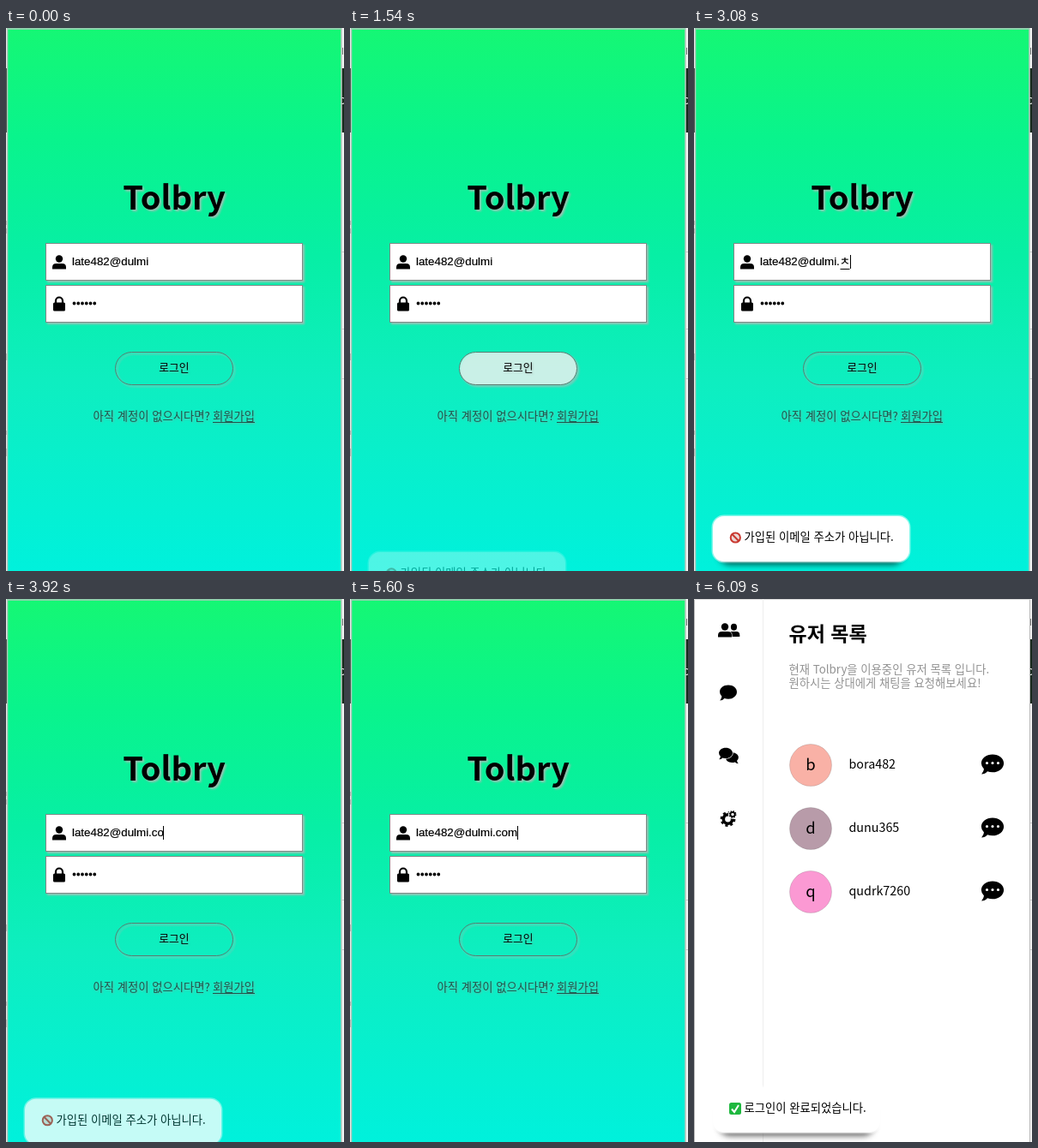
An HTML page that plays this animation: 394 by 634 pixels, repeating every 6860 ms.

```html
<!DOCTYPE html>
<html lang="ko">
<head>
<meta charset="utf-8">
<style>
  html, body { margin: 0; width: 100%; height: 100%; overflow: hidden; background: #fff; }
  svg { display: block; width: 394px; height: 634px; font: 13.33px "Noto Sans CJK KR", "Noto Sans CJK", "Noto Sans", sans-serif; }
  text { white-space: pre; }
  .shadow { filter: drop-shadow(2px 2px 1px rgba(178, 184, 182, .85)); }
  .soft { filter: drop-shadow(1px 1px 1px rgba(150, 160, 156, .6)); }
  .field { fill: #fff; stroke: #7d8a86; }
  .typed { font-family: "Liberation Sans", Arial, sans-serif; stroke: #000; stroke-width: .2px; }
  .mid { text-anchor: middle; }
  #toastShadow { filter: blur(3.5px); }
</style>
</head>
<body>
<svg viewBox="0 0 394 634">
  <defs>
    <linearGradient id="sky" x2="0" y2="1">
      <stop stop-color="#15f774"/>
      <stop offset=".2" stop-color="#09f48c"/>
      <stop offset=".42" stop-color="#07efa5"/>
      <stop offset=".65" stop-color="#0eeec0"/>
      <stop offset="1" stop-color="#00f1dc"/>
    </linearGradient>
    <path id="bubble" d="M0-9C6-9 10.5-5.5 10.5-1S6 7.3 0 7.3Q-2.6 7.3-4.8 6.5-7 9-10.3 9-8.2 6.6-8 4.3-10.5 2-10.5-1C-10.5-5.5-6-9 0-9Z"/>
    <g id="person"><circle cy="-4" r="4.2"/><path d="M-8 8V6Q-8 1.6-3.5 1.6H3.5Q8 1.6 8 6V8Z"/></g>
    <g id="gear" fill="none" stroke="#000">
      <circle r="5.2" stroke-width="3.6"/>
      <circle r="7.6" stroke-width="2.6" stroke-dasharray="3 2.97"/>
    </g>
  </defs>

  <!-- page behind the window -->
  <rect width="394" height="634" fill="#f4f4f4"/>
  <path d="M0 47h1v75h-1zM390 47h4v75h-4z" fill="#182a1d"/>
  <path d="M0 225v5m0 4v6m0 140v8m0 82v5m0 16v9M392.5 23v8" stroke="#777"/>
  <path d="M391 261.5h3m-3 90h3m-3 58h3" stroke="#ccc"/>
  <text x="388" y="89" fill="#fff">c</text>

  <g id="login">
    <rect x="1" width="390" height="634" fill="url(#sky)"/>
    <path d="M1.5 634V1H391V634" fill="none" stroke="#b4c8be" stroke-width="1.6"/>
    <text class="mid shadow" x="196" y="212" font-size="38" font-weight="700">Tolbry</text>
    <g class="shadow">
      <rect class="field" x="46.5" y="251.5" width="299" height="43"/>
      <rect class="field" x="46.5" y="300.5" width="299" height="43"/>
    </g>
    <use href="#person" x="62" y="273.5"/>
    <rect x="55" y="320.5" width="14" height="10" rx="1.6"/>
    <path d="M58 321v-2.5a4 4 0 0 1 8 0v2.5" fill="none" stroke="#000" stroke-width="2.2"/>
    <text class="typed" id="mail" x="77" y="277"></text>
    <path id="compose" stroke="#000" d="M170.5 281.5H181.5"/>
    <path id="caret" stroke="#000" d="M.5 265V281"/>
    <path d="M79.5 321.5h24" stroke="#000" stroke-width="3.8" stroke-linecap="round" stroke-dasharray="0 4.75"/>
    <rect id="button" class="shadow" x="127.5" y="378.5" width="137" height="38" rx="19" fill="#fff" stroke="#5b7d72"/>
    <text class="mid soft" x="196" y="401" font-size="12.8" font-weight="500">로그인</text>
    <g class="soft" fill="#24534b">
      <text x="101.5" y="458">아직 계정이 없으시다면?</text>
      <text x="241" y="458">회원가입</text>
      <path d="M241 460h49v1h-49z"/>
    </g>
  </g>

  <g id="list">
    <rect x="1" width="390" height="634" fill="#fff"/>
    <path d="M.5 0V634M391.5 0V634" stroke="#b9b9b9"/>
    <path d="M0 .5H392" stroke="#ddd"/>
    <path d="M80.5 0V634" stroke="#eee"/>
    <use href="#person" transform="translate(46.5 36.5) scale(.85 .95)"/>
    <use href="#person" transform="translate(36 36.5)" stroke="#fff" stroke-width="1.2" paint-order="stroke"/>
    <use href="#bubble" transform="translate(40 109.5) scale(.95 1)"/>
    <use href="#bubble" transform="translate(44.3 185.7) scale(-.72 .72)"/>
    <use href="#bubble" transform="translate(37 180.5) scale(.76)" stroke="#fff" stroke-width="2" paint-order="stroke"/>
    <use href="#gear" x="39.5" y="257"/>
    <circle cx="45" cy="251.5" r="5.2" fill="#fff"/>
    <use href="#gear" transform="translate(45 251.5) scale(.5)"/>
    <text x="110.5" y="49" font-size="23" font-weight="700">유저 목록</text>
    <g fill="#929292">
      <text x="110.5" y="87">현재 Tolbry을 이용중인 유저 목록 입니다.</text>
      <text x="110.5" y="103">원하시는 상대에게 채팅을 요청해보세요!</text>
    </g>
    <g id="users"></g>
  </g>

  <g id="toast">
    <rect id="toastShadow" x="29" y="590" height="37" rx="13" fill-opacity=".6"/>
    <rect id="toastBox" x="22" y="570" height="53" rx="13" fill="#fff" stroke="#fff" stroke-opacity=".5" stroke-width="3"/>
    <g id="denied" fill="none" stroke="#c9382f" stroke-width="2">
      <circle cx="48.3" cy="595" r="5.6" fill="#ead9d6"/><path d="M44.4 591l7.8 8"/>
    </g>
    <g id="done">
      <rect x="41" y="588" width="14" height="14" rx="2.5" fill="#1fb83f"/>
      <path d="M44 595.5l3 3.5 5-8" fill="none" stroke="#fff" stroke-width="2"/>
    </g>
    <text id="message" x="58.5" y="599" font-weight="500"></text>
  </g>
</svg>
<script>
const LOOP = 6860, STEP = 70, LOGGED_IN = 5670;
const $ = id => document.getElementById(id);
const ease = (t, from, to) => {
  const p = Math.min(1, Math.max(0, (t - from) / (to - from)));
  return p * p * (3 - 2 * p);
};
const show = (id, on) => $(id).setAttribute('visibility', on ? 'visible' : 'hidden');

const users = [['bora482', '#f9b1a6'], ['dunu365', '#b89ba9'], ['qudrk7260', '#fb99d3']];
$('users').innerHTML = users.map(([name, color], i) => `
  <g transform="translate(0 ${194 + 74 * i})">
    <circle cx="136" r="24.5" fill="${color}" stroke="#555" stroke-opacity=".2"/>
    <text class="mid" x="136" y="6" font-size="18.5">${name[0]}</text>
    <text x="180.5" y="4" font-size="14.3" font-weight="500">${name}</text>
    <use href="#bubble" transform="translate(348 -1) scale(1.25 1.28)"/>
    <path d="M341.5-2.5h14" stroke="#fff" stroke-width="3.2" stroke-linecap="round" stroke-dasharray="0 6.5"/>
  </g>`).join('');

// [time, text after the address]
const typing = [[0, ''], [2730, '.'], [3080, '.ㅊ'], [3290, '.'], [3430, '.c'], [3500, '.co'], [4830, '.com']];

function draw() {
  const t = Math.floor(performance.now() % LOOP / STEP) * STEP;
  const member = t >= LOGGED_IN;
  show('login', !member);
  show('list', member);

  const suffix = typing.findLast(([at]) => t >= at)[1];
  $('mail').textContent = 'late482@dulmi' + suffix;
  show('compose', !member && suffix === '.ㅊ');
  show('caret', !member && t >= 2100);
  $('caret').setAttribute('transform', `translate(${Math.floor(77 + $('mail').getComputedTextLength())})`);
  $('button').setAttribute('fill-opacity', ease(t, 860, 1260) - ease(t, 1400, 1750));

  const up = member ? ease(t, LOGGED_IN - STEP, 6090) : ease(t, 1380, 1820) - ease(t, 3740, 4320);
  const width = member ? 195 : 229;
  $('toast').setAttribute('transform', `translate(0 ${60 * (1 - up)})`);
  $('toast').setAttribute('opacity', up);
  $('toastBox').setAttribute('width', width);
  $('toastShadow').setAttribute('width', width - 14);
  show('denied', !member);
  show('done', member);
  $('message').textContent = member ? '로그인이 완료되었습니다.' : '가입된 이메일 주소가 아닙니다.';
  requestAnimationFrame(draw);
}
draw();
</script>
</body>
</html>
```
